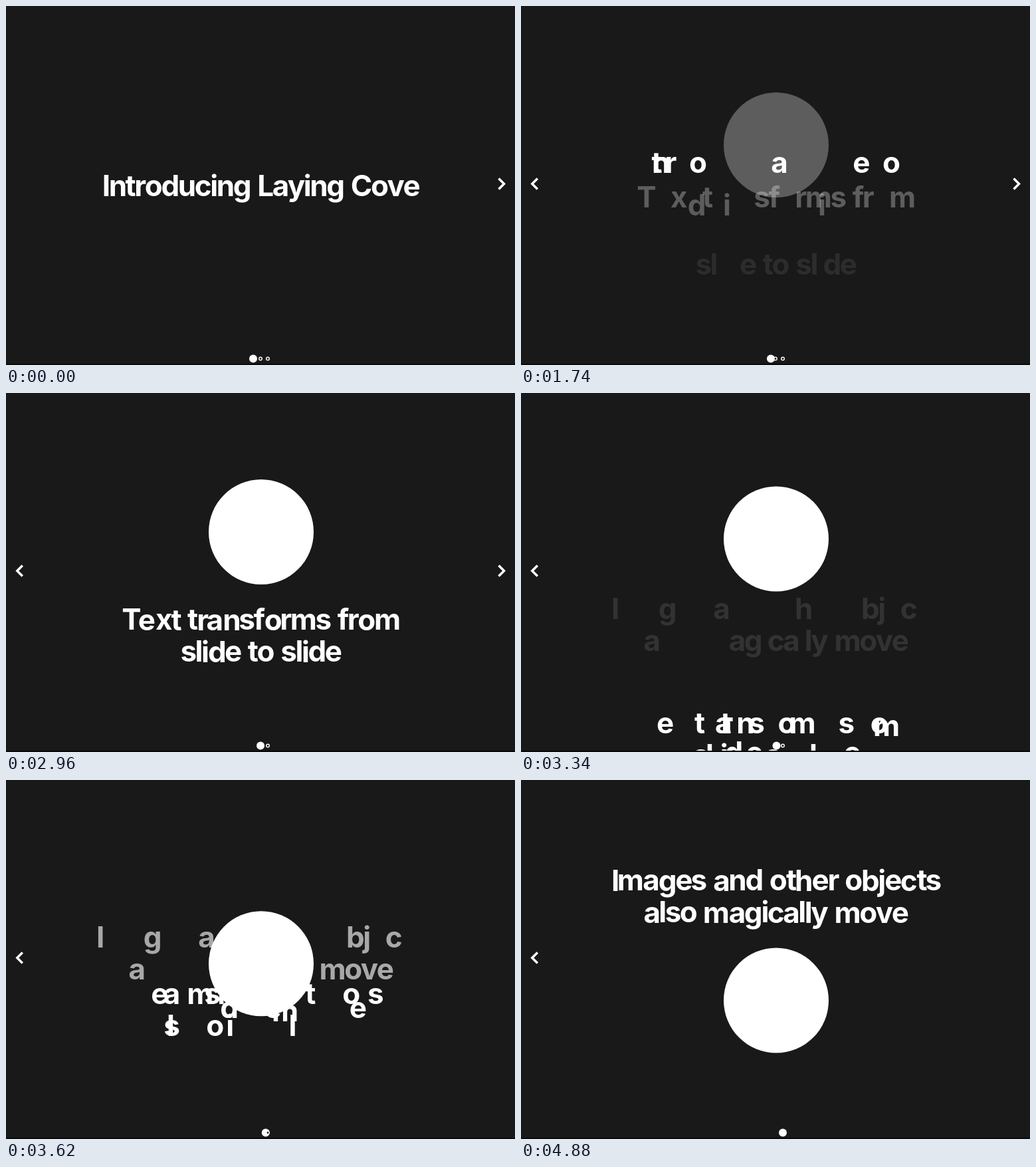
An HTML page that plays this animation: 766x540 px, repeating every 5180 ms.

```html
<!DOCTYPE html>
<html lang="en">
<head>
<meta charset="utf-8">
<title>Slides</title>
<style>
  html, body { margin: 0; width: 100%; height: 100%; overflow: hidden; background: #191919; }
  #stage { position: relative; width: 766px; height: 540px; overflow: hidden; background: #191919; }
  .slide { position: absolute; inset: 0; visibility: hidden; }
  .slide.on { visibility: visible; }
  .line {
    position: absolute; left: 0; width: 100%; height: 48px;
    font: 700 44px/48px Inter, "Liberation Sans", sans-serif;
    font-optical-sizing: none; letter-spacing: -.055em; word-spacing: .07em;
    text-align: center; white-space: pre; color: #fff;
  }
  .line span { display: inline-block; }
  .disc { position: absolute; left: 304.5px; width: 158px; height: 158px; border-radius: 50%; background: #fff; }
  svg { position: absolute; inset: 0; }
  .arrow { fill: none; stroke: #fff; stroke-width: 3.5; }
  .ring { fill: #191919; stroke: #fff; stroke-width: 1.4; }
  #edge { position: absolute; left: 0; bottom: 0; width: 100%; height: 2px; background: #0a0a0a; }
</style>
</head>
<body>
<div id="stage">
  <div class="slide">
    <div class="line" style="top:246px">Introducing Laying Cove</div>
  </div>
  <div class="slide">
    <div class="disc" style="top:129.5px"></div>
    <div class="line" style="top:316px">Text transforms from</div>
    <div class="line" style="top:364px">slide to slide</div>
  </div>
  <div class="slide">
    <div class="line" style="top:128px">Images and other objects</div>
    <div class="line" style="top:176px">also magically move</div>
    <div class="disc" style="top:251.5px"></div>
  </div>
  <svg width="766" height="540">
    <path id="prev" class="arrow" d="M24.8 259.5L16.8 267.5L24.8 275.5"/>
    <path id="next" class="arrow" d="M741.5 259.5L749.5 267.5L741.5 275.5"/>
    <circle id="dot" cx="372" cy="530.5" r="6" fill="#fff"/>
    <g class="ring"><circle r="2.3"/></g>
    <g class="ring"><circle r="2.3"/></g>
  </svg>
  <div id="edge"></div>
</div>
<script>
const LOOP = 5180;
const SHOWN = [0, 1540, 3220];   // when each slide appears
const MOVES = [0, 1531, 3232];   // when its springs are released
const SPEED = 4.34, DAMPING = 0.85;
const FADE_RATE = 1.13, DOT_RATE = 1.3, RING_TIME = 1.42;

const byId = id => document.getElementById(id);
const rings = [...document.querySelectorAll('.ring')];

// Progress of a slightly underdamped spring after t seconds
function spring(t) {
  const x = SPEED * Math.max(0, t);
  const k = Math.sqrt(1 - DAMPING * DAMPING);
  return 1 - Math.exp(-DAMPING * x) * (Math.cos(k * x) + DAMPING / k * Math.sin(k * x));
}

// Splits a line into letter boxes, keyed by character and occurrence in the slide
function splitLine(el, counts) {
  const text = el.textContent;
  const top = parseFloat(el.style.top);
  const letters = [];
  el.textContent = '';
  for (const ch of text) {
    if (ch === ' ') { el.append(' '); continue; }
    const span = document.createElement('span');
    span.textContent = ch;
    el.append(span);
    counts[ch] = (counts[ch] || 0) + 1;
    letters.push({ el: span, key: ch + counts[ch], y: top });
  }
  for (const l of letters) l.x = l.el.getBoundingClientRect().left;
  return { el, top, letters };
}

const slides = [...document.querySelectorAll('.slide')].map(el => {
  const counts = {};
  const lines = [...el.querySelectorAll('.line')].map(l => splitLine(l, counts));
  const disc = el.querySelector('.disc');
  return { el, lines, disc, discTop: disc && parseFloat(disc.style.top) };
});

// Links every letter, line and disc to its counterpart on the previous slide
slides.forEach((slide, i) => {
  const old = slides[i - 1];
  if (!old) return;
  const known = new Map(old.lines.flatMap(l => l.letters).map(l => [l.key, l]));
  slide.lines.forEach((line, n) => {
    line.from = old.lines[n];
    for (const l of line.letters) l.from = known.get(l.key);
  });
  if (old.disc) slide.discFrom = old.discTop;
});

const shift = (el, x, y) => { el.style.transform = `translate(${x}px, ${y}px)`; };

// Line and letter offsets add up, so matched letters travel further than their line
function pose(slide, t) {
  const left = 1 - spring(t);
  const fade = Math.min(1, spring(t * FADE_RATE));
  for (const line of slide.lines) {
    if (line.from) shift(line.el, 0, (line.from.top - line.top) * left);
    else line.el.style.opacity = fade;
    for (const l of line.letters) {
      if (l.from) shift(l.el, (l.from.x - l.x) * left, (l.from.y - l.y) * left);
      else l.el.style.opacity = fade;
    }
  }
  if (slide.discFrom !== undefined) shift(slide.disc, 0, (slide.discFrom - slide.discTop) * left);
  else if (slide.disc) slide.disc.style.opacity = fade;
}

function draw(ms) {
  const now = ms % LOOP;
  const index = SHOWN.filter(s => now >= s).length - 1;
  const t = Math.max(0, now - MOVES[index]) / 1000;

  slides.forEach((s, i) => s.el.classList.toggle('on', i === index));
  if (index) pose(slides[index], t);

  byId('prev').style.visibility = index > 0 ? 'visible' : 'hidden';
  byId('next').style.visibility = index < 2 ? 'visible' : 'hidden';
  const step = index ? index - 1 + spring(t * DOT_RATE) : 0;
  byId('dot').setAttribute('cx', 372 + 11 * step);
  rings.forEach((ring, i) => {
    const place = i + 1;
    const size = place > index ? 1 : place < index ? 0 : Math.max(0, 1 - (t / RING_TIME) ** 2);
    ring.setAttribute('transform', `translate(${372 + 11 * place} 530.5) scale(${size})`);
  });
}

const begin = performance.now();
function tick() {
  draw(performance.now() - begin);
  requestAnimationFrame(tick);
}
tick();
</script>
</body>
</html>
```
